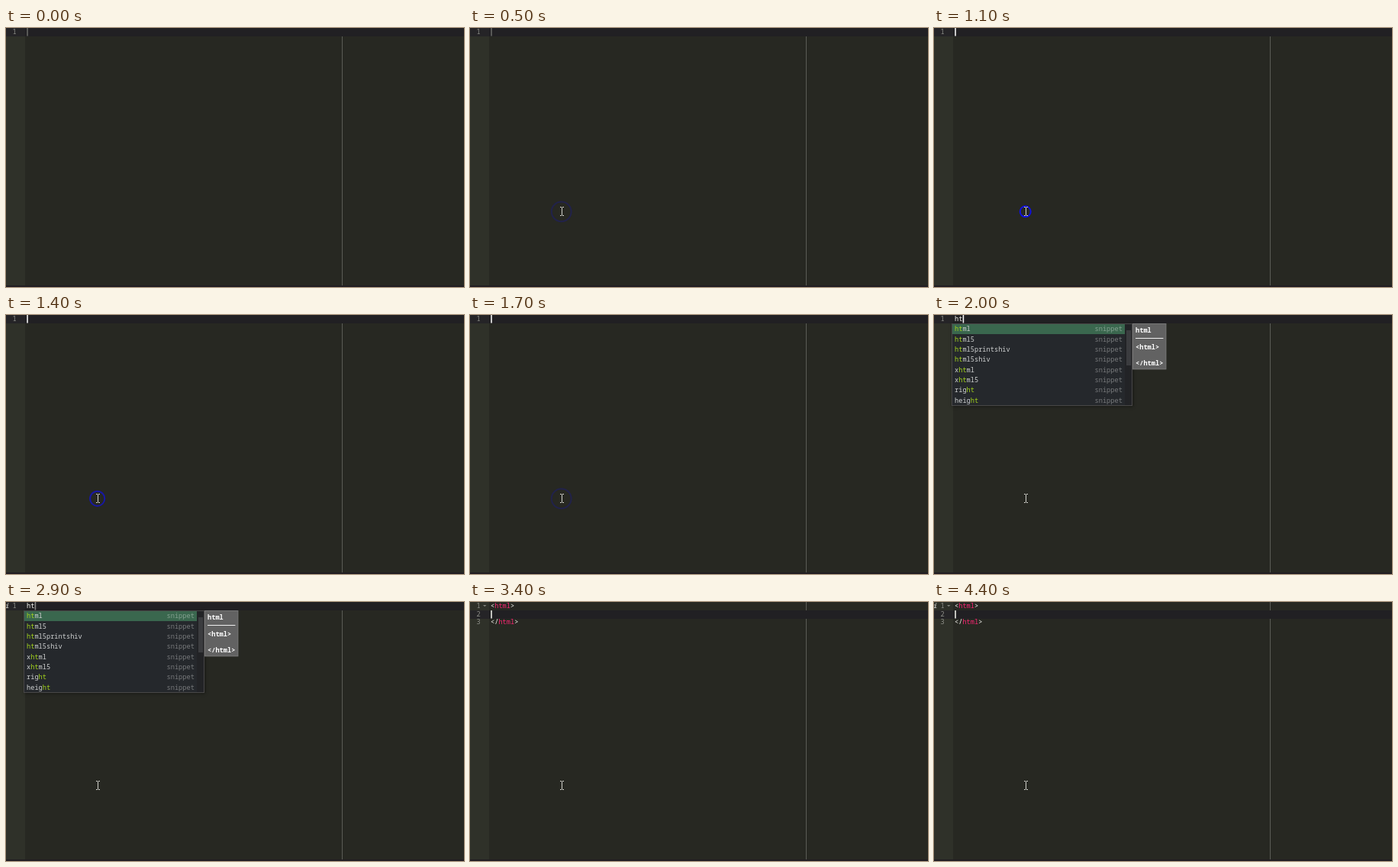
Recreate the animation shown at these times as an HTML page with a canvas. Size 600x339 px, loop 5 s.

```html
<!DOCTYPE html>
<html lang="en">
<head>
<meta charset="utf-8">
<title>Snippet completion</title>
<style>
html, body { margin: 0; width: 100%; height: 100%; overflow: hidden; background: #272822; }
canvas { display: block; width: 100vw; height: 100vh; }
</style>
</head>
<body>
<canvas id="stage" width="600" height="339"></canvas>
<script>
const ctx = document.getElementById('stage').getContext('2d');
const LOOP = 5000, CHAR = 5.2, LINE = 10.67, ROW = 13.33;
const FONT = '8.67px "Noto Sans Mono", "DejaVu Sans Mono", monospace';
const LISTS = {
  h: ['h1', 'h2', 'h3', 'h4', 'h5', 'h6', 'head', 'header'],
  ht: ['html', 'html5', 'html5printshiv', 'html5shiv', 'xhtml', 'xhtml5', 'right', 'height']
};
const DOCS = {
  h: ['<h1></h1>'],
  ht: ['<html>', '', '</html>']
};

function rect(x, y, w, h, color) {
  ctx.fillStyle = color;
  ctx.fillRect(x, y, w, h);
}

function text(str, x, mid, color, style = '') {
  ctx.font = style + ' ' + FONT;
  ctx.fillStyle = color;
  ctx.fillText(str, x, mid + 3);
}

function frameBox(x, y, w, h, fill, border) {
  rect(x, y, w, h, border);
  rect(x + 1, y + 1, w - 2, h - 2, fill);
}

function drawEditor(lines, active) {
  rect(0, 0, 600, 339, '#272822');
  rect(0, 0, 25, 339, '#2f3129');
  rect(440, 0, 1, 339, '#5a5b56');
  const top = Math.round(active * LINE);
  rect(0, top, 25, 11, '#252427');
  rect(25, top, 575, 11, '#212023');
  rect(0, 337, 600, 2, '#211d22');
  for (let i = 0; i < lines; i++) {
    text(i + 1, 8.5, 5 + i * LINE, '#8f908a');
  }
}

function drawTag(open, row) {
  const mid = 5 + row * LINE;
  const x = 27 + open.length * CHAR;
  text(open, 27, mid, '#f8f8f2');
  text('html', x, mid, '#f92672');
  text('>', x + 4 * CHAR, mid, '#f8f8f2');
}

function drawCaret(x, row, color) {
  if (color) rect(x, Math.round(row * LINE), 1.5, 10.5, color);
}

function drawPopup(key) {
  ctx.save();
  ctx.shadowColor = 'rgba(0,0,0,.4)';
  ctx.shadowBlur = 4;
  ctx.shadowOffsetX = ctx.shadowOffsetY = 1;
  rect(23, 11, 237, 108, '#484747');
  ctx.restore();
  rect(24, 12, 235, 106, '#25282c');
  rect(24, 12, 226, 13, '#3a674e');
  rect(250, 12, 9, 106, '#222326');
  rect(252, 20, 6, 46, '#3b3c3f');
  LISTS[key].forEach((word, i) => {
    const mid = 18.2 + i * ROW;
    const at = word.indexOf(key);
    text(word, 27, mid, '#d0d2d2');
    const x = 27 + at * CHAR, w = key.length * CHAR;
    rect(x, mid - 5, w, 10, i ? '#25282c' : '#3a674e');
    text(key, x, mid, '#a4d51c');
    text('snippet', 210.5, mid, i ? '#77797b' : '#84a090');
  });
  drawDoc(LISTS[key][0], DOCS[key]);
}

function drawDoc(title, body) {
  const w = Math.max(...body.map(s => s.length)) * CHAR;
  frameBox(260, 11, w + 8, 39 + (body.length - 1) * LINE, '#626262', '#777');
  text(title, 264, 20, '#fff', 'bold');
  rect(264, 30, w, 1, '#eee');
  body.forEach((s, i) => text(s, 264, 41.7 + i * LINE, '#fff', 'bold'));
}

function drawInfo() {
  text('i', -1.5, 4.5, '#b5b6b2', 'italic bold');
}

function drawFold() {
  ctx.fillStyle = '#85867f';
  ctx.beginPath();
  ctx.moveTo(17, 4);
  ctx.lineTo(21.5, 4);
  ctx.lineTo(19.2, 6);
  ctx.fill();
}

// Rings spread on release and close in on press.
function ringAt(t) {
  const spread = start => {
    const k = (t - start) / 100;
    return { r: 8.5 + 1.1 * k, a: 0.85 - 0.16 * k };
  };
  if (t < 100) return null;
  if (t < 700) return spread(100);
  if (t < 1100) {
    const k = Math.min(2, (t - 700) / 100);
    return { r: 13.5 - 1.6 * k, a: 0.2 + 0.25 * k };
  }
  if (t < 1300) return { r: 7, a: 1 };
  return t < 1900 ? spread(1300) : null;
}

function drawPointer(t) {
  if (t < 100) return;
  const ring = ringAt(t);
  if (ring) {
    ctx.strokeStyle = `rgba(16,16,225,${Math.max(0, ring.a)})`;
    ctx.lineWidth = 2;
    ctx.beginPath();
    ctx.arc(119.7, 240.3, ring.r, 0, Math.PI * 2);
    ctx.stroke();
  }
  const c = '#d2d2cc';
  rect(120, 235, 1, 10, c);
  for (const y of [234, 245]) {
    rect(118, y, 2, 1, c);
    rect(121, y, 2, 1, c);
  }
}

function caretColor(t) {
  if (t < 1100) return '#6b6b69';
  if (t < 2500) return '#fff';
  if (t < 2900) return null;
  if (t < 3400) return '#8a8a87';
  return t >= 3900 && t < 4400 ? null : '#f8f8f0';
}

function draw(now) {
  const t = Math.floor(now % LOOP / 100) * 100;
  const done = t >= 3400;
  drawEditor(done ? 3 : 1, done ? 1 : 0);
  if (done) {
    drawFold();
    drawTag('<', 0);
    drawTag('</', 2);
    drawCaret(27.3, 1, caretColor(t));
  } else {
    const typed = t < 1800 ? '' : t < 1900 ? 'h' : 'ht';
    text(typed, 27, 5, '#f8f8f2');
    drawCaret(27.3 + typed.length * CHAR, 0, caretColor(t));
    if (typed) drawPopup(t < 2000 ? 'h' : 'ht');
  }
  if ((t >= 2300 && !done) || t >= 3800) drawInfo();
  drawPointer(t);
}

const start = performance.now();
function tick() {
  draw(performance.now() - start);
  requestAnimationFrame(tick);
}
tick();
</script>
</body>
</html>
```
